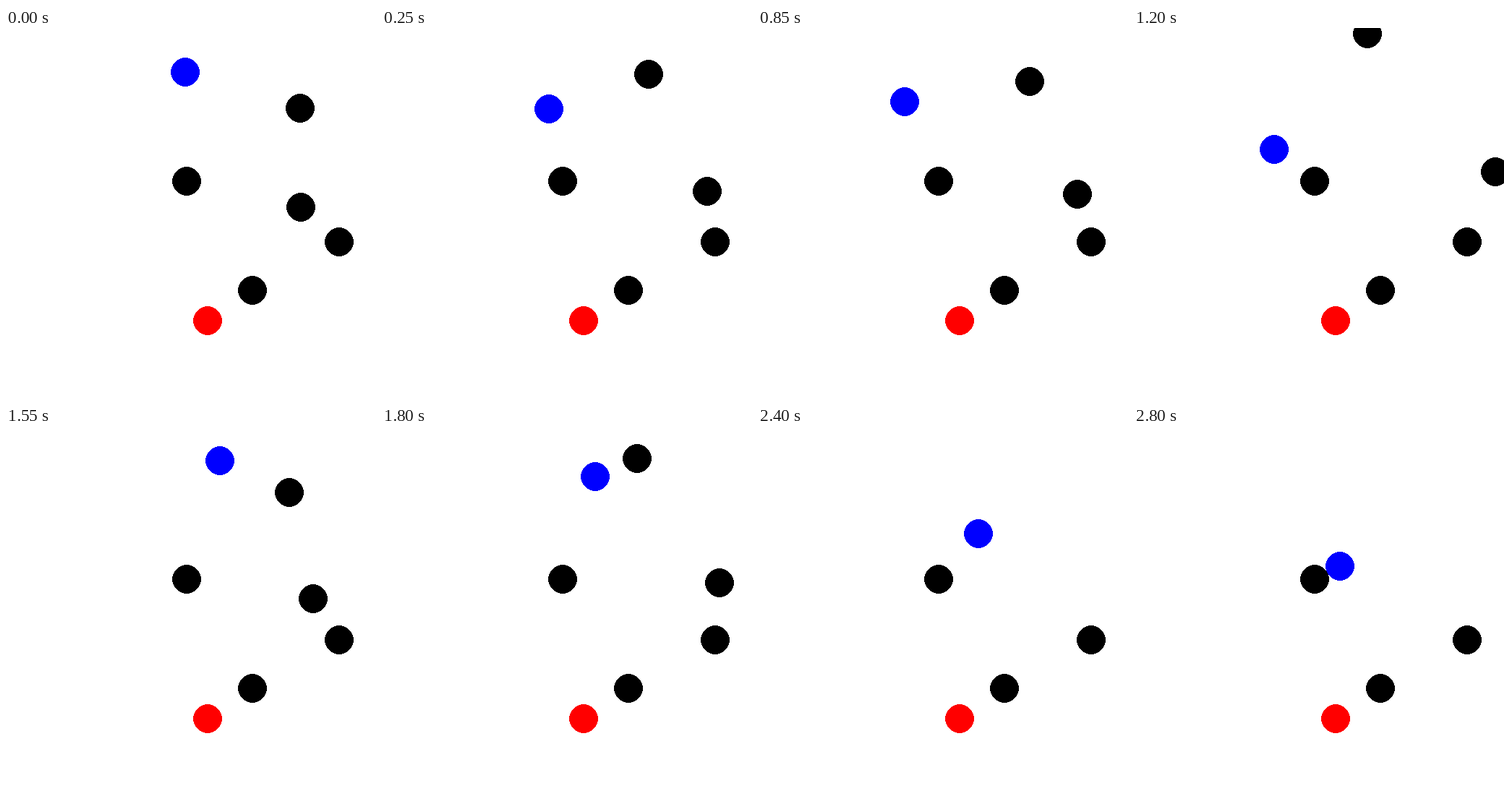
These frames come from a looping animation (512 by 512 pixels, 2.85 s). An HTML page with a canvas:

```html
<!DOCTYPE html>
<html lang="en">
<head>
<meta charset="utf-8">
<title>Dots</title>
<style>
  html, body { margin: 0; width: 100%; height: 100%; overflow: hidden; background: #fff; }
  canvas { display: block; width: 512px; height: 512px; }
</style>
</head>
<body>
<canvas id="stage" width="512" height="512"></canvas>
<script>
const ctx = document.getElementById("stage").getContext("2d");
const STEP = 50, STEPS = 57, R = 20;

const obstacles = [{ x: 250, y: 212 }, { x: 341, y: 363 }, { x: 461, y: 296 }];
const goal = { x: 279, y: 405 };
const drifters = [
  { x: 407, y: 111, vx: -7.67, vy: -9.37 },
  { x: 408, y: 248, vx: 8.4, vy: -4.42 }
];

// The blue dot's turning points; each run ends when it touches an obstacle.
const key = (step, x, y) => ({ step, x, y });
const runs = [
  [key(0, 248, 61), key(10, 213, 162), key(12, 225, 181)],
  [key(13, 216, 62), key(17, 203, 102), key(24, 194, 168), key(28, 213, 199)],
  [key(29, 296, 39), key(41, 295, 92), key(46, 317, 134), key(51, 287, 172), key(56, 285, 194)]
];

const lerp = (a, b, k) => a + (b - a) * k;

// Hard-edged midpoint circle, drawn as pairs of rows
function disc({ x, y }, color) {
  const cx = Math.round(x), cy = Math.round(y);
  ctx.fillStyle = color;
  for (let row = 1; row <= R; row++) {
    const half = Math.max(
      Math.round(Math.sqrt(R * R - row * row)),
      Math.floor(Math.sqrt(R * R - (row - 0.5) ** 2))
    );
    ctx.fillRect(cx - half, cy - row, 2 * half, 1);
    ctx.fillRect(cx - half, cy + row - 1, 2 * half, 1);
  }
}

function along(path, step) {
  const next = Math.max(1, path.findIndex(point => point.step >= step));
  const a = path[next - 1], b = path[next];
  const k = (step - a.step) / (b.step - a.step);
  return { x: lerp(a.x, b.x, k), y: lerp(a.y, b.y, k) };
}

function draw(step) {
  const run = runs.find(path => step <= path[path.length - 1].step);
  const age = step - run[0].step;
  ctx.fillStyle = "#fff";
  ctx.fillRect(0, 0, 512, 512);
  for (const dot of obstacles) disc(dot, "#000");
  for (const { x, y, vx, vy } of drifters) {
    disc({ x: x + vx * age, y: y + vy * age }, "#000");
  }
  disc(goal, "#f00");
  disc(along(run, step), "#00f");
}

const start = performance.now();
function tick() {
  const elapsed = performance.now() - start;
  draw(Math.floor(elapsed / STEP) % STEPS);
  requestAnimationFrame(tick);
}
tick();
</script>
</body>
</html>
```
